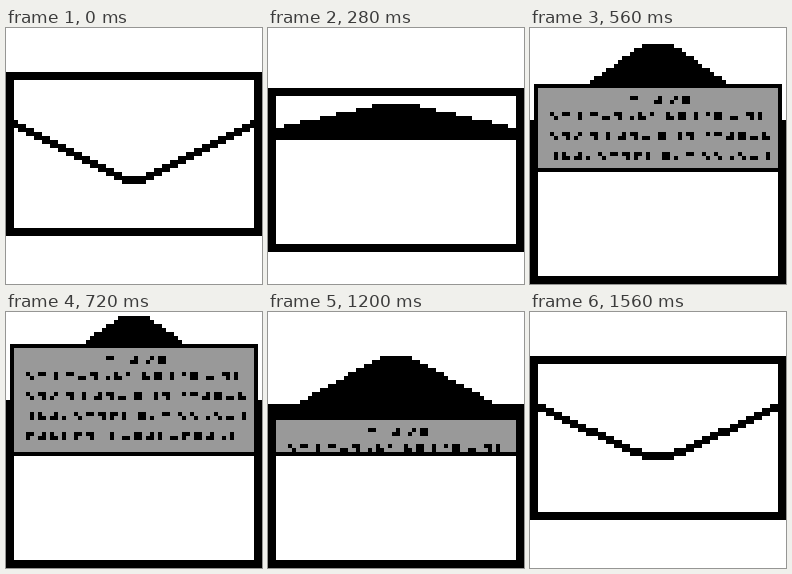
These frames come from a looping animation (256 px wide and 256 px high, 1.6 s). An HTML page with a canvas:

```html
<!DOCTYPE html>
<html lang="en">
<head>
<meta charset="utf-8">
<title>Opening envelope</title>
<style>
  html, body { margin: 0; width: 100%; height: 100%; overflow: hidden; background: #fff; }
  canvas { display: block; width: 100%; height: 100%; image-rendering: pixelated; }
</style>
</head>
<body>
<canvas id="stage" width="256" height="256"></canvas>
<script>
const ctx = document.getElementById('stage').getContext('2d');
ctx.scale(4, 4); // everything below is measured in 4px cells

const LOOP = 1600, STEP = 40;
const BLACK = '#000', WHITE = '#fff', GRAY = '#999';

// Flap poses: step, tip row, slope of the sides, half width of the flat tip
const FLAP = [
  [0, 37, -0.5, 2],
  [1, 35, -0.46, 3.4],
  [4, 25, -0.08, 3.4],
  [6, 19, 0.22, 3.4],
  [10, 11, 0.55, 3.4],
  [14, 1, 0.73, 3.4]
];

const clamp = (v, lo, hi) => Math.min(hi, Math.max(lo, v));

function box(x, y, w, h, color = BLACK) {
  ctx.fillStyle = color;
  ctx.fillRect(x, y, w, h);
}

function stepAt(t) {
  if (t < 80) return 0;
  if (t < 720) return Math.floor((t - 80) / STEP) + 1;
  if (t < 1040) return 17;
  return 14 - Math.floor((t - 1040) / STEP);
}

function flapPose(step) {
  const s = Math.min(step, 14);
  const i = Math.max(1, FLAP.findIndex(pose => pose[0] >= s));
  const a = FLAP[i - 1], b = FLAP[i];
  const f = (s - a[0]) / (b[0] - a[0]);
  const [, tip, slope, flat] = a.map((v, n) => v + (b[n] - v) * f);
  return { tip: Math.round(tip), slope, flat };
}

function drawFlap({ tip, slope, flat }, edge) {
  const open = slope > 0;
  for (let x = 0; x < 64; x++) {
    const run = Math.max(0, Math.abs(x - 31.5) - flat);
    const y = tip + Math.sign(slope) * Math.round(run * Math.abs(slope));
    if (open) box(x, y, 1, Math.max(0, edge + 1 - y));
    else box(x, y, 1, 2);
  }
}

// Illegible writing: little two by two letters with gaps
function drawWriting(top) {
  let seed = 41;
  const random = () => (seed = (seed * 16807) % 2147483647) / 2147483647;
  for (let line = 0; line < 5; line++) {
    const [from, to] = line ? [5, 59] : [25, 40];
    const y = top + (line ? 2 + line * 5 : 3);
    for (let x = from; x < to; x += random() < 0.25 ? 4 : 3) {
      for (let n = 0; n < 4; n++) {
        if (random() < 0.62) box(x + n % 2, y + (n >> 1), 1, 1);
      }
    }
  }
}

function drawLetter(top, edge) {
  if (top >= edge) return;
  ctx.save();
  ctx.beginPath();
  ctx.rect(0, 0, 64, edge);
  ctx.clip();
  box(1, top, 62, 40);
  box(2, top + 1, 60, 40, GRAY);
  drawWriting(top);
  ctx.restore();
}

function draw(step) {
  const top = 11 + clamp((step - 4) * 2, 0, 12);
  const edge = top + 12;
  const pose = flapPose(step);

  box(0, 0, 64, 64, WHITE);
  box(0, top, 64, 41);
  box(2, top + 2, 60, 37, WHITE);
  drawFlap(pose, edge);

  if (pose.slope > 0) {
    drawLetter(step > 15 ? step - 9 : 66 - 4 * step, edge);
    box(0, edge, 64, 1);
    box(2, edge + 1, 60, 26, WHITE);
  }
}

function tick(now) {
  draw(stepAt(now % LOOP));
  requestAnimationFrame(tick);
}
tick(performance.now());
</script>
</body>
</html>
```
